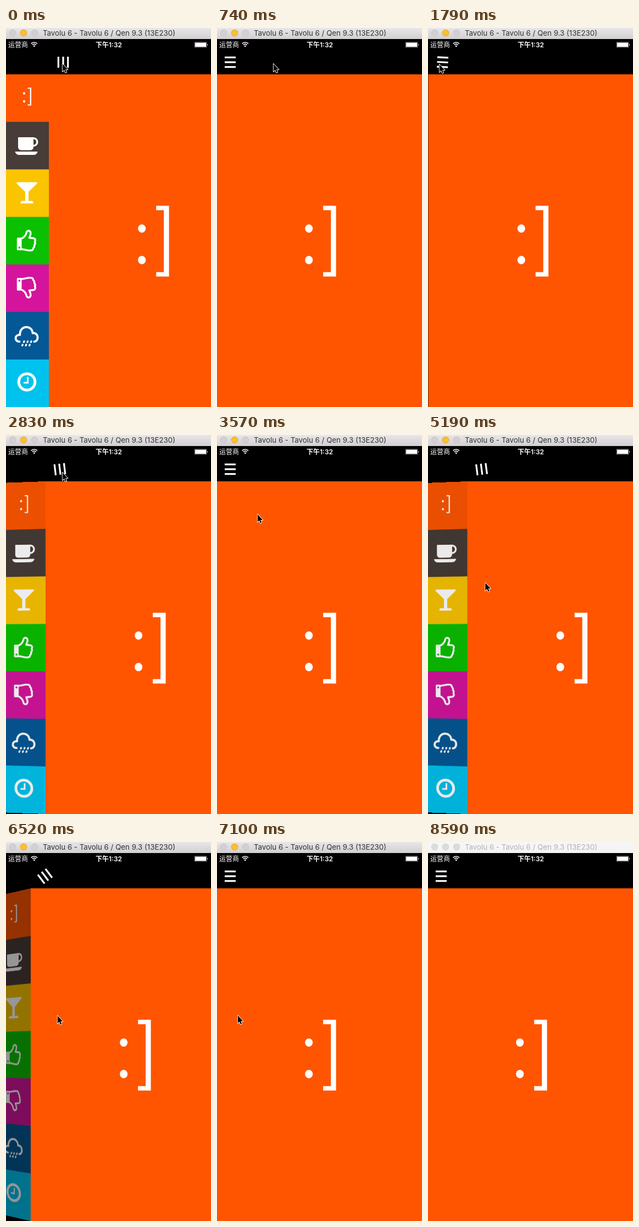
An HTML page with a canvas for the animation above (8.69 s loop, 373 by 687 pixels).

```html
<!DOCTYPE html>
<html lang="zh">
<head>
<meta charset="utf-8">
<title>Folding side menu</title>
<style>
  html, body { margin: 0; width: 100%; height: 100%; overflow: hidden; background: #000; }
  canvas { display: block; }
</style>
</head>
<body>
<canvas id="stage" width="373" height="687"></canvas>
<script>
const W = 373, H = 687, LOOP = 8690;
const TOP = 84, MENU_W = 80, MENU_H = H - TOP, ROW = MENU_H / 7, SS = 2;
const ORANGE = '#ff5500';
const TILES = [ORANGE, '#473c37', '#fac400', '#0bc000', '#d4149c', '#045896', '#00c2ee'];
const SANS = 'Inter, "Noto Sans CJK SC", "Noto Sans CJK", sans-serif';

const RUNS = [[0, 0, 1], [440, 1190, 6], [1790, 2530, 6], [2830, 5930, 22], [6220, 8140, 14], [8590, 8590, 1]];

// Pointer tip: [time, x, y]
const POINTER = [
  [0, 102, 64], [740, 102, 64], [1190, 20, 65], [2080, 20, 65], [2530, 102, 67],
  [3270, 102, 67], [4010, 30, 255], [4300, 30, 264], [4601, 50, 265], [5043, 86, 265],
  [5192, 103.5, 267], [5340, 114, 272], [5930, 126, 314], [6220, 122, 314],
  [6515, 93, 314], [6960, 47, 314], [7253, 27, 313], [7400, 33, 318], [7993, 283, 637]
];
const POINTER_OUT = 8130;

const stage = document.getElementById('stage');
const g = stage.getContext('2d');
g.imageSmoothingQuality = 'high';

const clamp = (v, a, b) => Math.min(b, Math.max(a, v));
const ease = p => (1 - Math.cos(Math.PI * clamp(p, 0, 1))) / 2;
const tap = (t, start) => ease((t - start) / 350);

function snap(t) {
  const [a, b, n] = RUNS.filter(r => t >= r[0]).pop();
  if (n < 2) return a;
  const step = (b - a) / (n - 1);
  return a + step * Math.min(n - 1, Math.floor((t - a + 12) / step));
}

function pointerAt(t) {
  const i = POINTER.findIndex(k => k[0] > t);
  if (i < 0) return POINTER[POINTER.length - 1].slice(1);
  const [t0, x0, y0] = POINTER[i - 1], [t1, x1, y1] = POINTER[i];
  const p = (t - t0) / (t1 - t0);
  return [x0 + (x1 - x0) * p, y0 + (y1 - y0) * p];
}

// How far the menu is pulled out, 0 to MENU_W
function shiftAt(t) {
  if (t < 440) return MENU_W;
  if (t < 1500) return MENU_W * (1 - tap(t, 390));
  if (t < 2650) return MENU_W * tap(t, 1750);
  if (t < 4200) return MENU_W * (1 - tap(t, 2768));
  if (t > 7050) return 0;
  return clamp(pointerAt(t)[0] - (t < 6100 ? 30 : 46), 0, MENU_W);
}

function rect(c, color, x, y, w, h) {
  c.fillStyle = color;
  c.fillRect(x, y, w, h);
}

function disc(c, color, x, y, rx, ry = rx) {
  c.fillStyle = color;
  c.beginPath();
  c.ellipse(x, y, rx, ry, 0, 0, Math.PI * 2);
  c.fill();
}

function stroke(c, d, width, color = '#fff') {
  c.strokeStyle = color;
  c.lineWidth = width;
  c.stroke(new Path2D(d));
}

function fill(c, d, color = '#fff') {
  c.fillStyle = color;
  c.fill(new Path2D(d));
}

function label(text, x, y, font, color, align) {
  g.font = font + ' ' + SANS;
  g.fillStyle = color;
  g.textAlign = align;
  g.fillText(text, x, y);
}

function drawThumb(c, hole) {
  fill(c, 'M21.5 380 H27 Q28.5 380 28.5 381.5 V401.5 Q28.5 403 27 403 H21.5 Q19.8 403 19.8 401 V382 Q19.8 380 21.5 380 Z');
  disc(c, hole, 24.3, 398, 1.7);
  stroke(c, 'M27.5 381.8 C32 380.5 35.5 376.5 37 372 C37.5 367 41.5 366.5 44 369 C46 372 44 376 42.5 380.3 L49.5 381 C53.5 381.5 54 385 52.5 387.5 C53.5 390 53 392 51.5 393.5 C52 396 51 398 49.5 399 C49.5 402.5 47 403.3 44 403.3 C37.5 403.3 33.5 401 27.5 401', 3.4);
}

function buildMenu() {
  const m = document.createElement('canvas');
  m.width = MENU_W * SS;
  m.height = Math.round(MENU_H * SS);
  const c = m.getContext('2d');
  c.scale(SS, SS);
  c.translate(2, -TOP);
  c.lineJoin = c.lineCap = 'round';
  TILES.forEach((color, i) => rect(c, color, -2, TOP + i * ROW, MENU_W, ROW + 1));

  // smile
  disc(c, '#fff', 33, 118.5, 2, 2.2);
  disc(c, '#fff', 33, 133, 2, 2.2);
  fill(c, 'M39.5 108 H46 V140.5 H39.5 V138.5 H43.6 V110 H39.5 Z');

  // coffee
  fill(c, 'M22 198 H50 V215 Q50 221.5 43.5 221.5 H28.5 Q22 221.5 22 215 Z');
  stroke(c, 'M49 199.8 H50 A6.8 6.8 0 0 1 50 213.4 H49', 3.2);
  fill(c, 'M16.5 224 H57.5 Q56 230 50 230 H24 Q18 230 16.5 224 Z');

  // cocktail
  fill(c, 'M20.5 279.5 H55.5 Q58 280.5 56 282.5 L41 297 V313.5 H47.5 Q50 314.5 49.5 318 H26.5 Q26 314.5 28.5 313.5 H35 V297 L20 282.5 Q18 280.5 20.5 279.5 Z');

  // thumbs
  drawThumb(c, TILES[3]);
  c.save();
  c.translate(0, 856);
  c.scale(1, -1);
  drawThumb(c, TILES[4]);
  c.restore();

  // rain cloud
  stroke(c, 'M24.5 568.5 C19 568.5 17.6 564.5 17.6 562.5 C17.6 558.5 21 556 25.3 556.3 C25 548 30 542.2 37 542.2 C43.5 542.2 48 546.5 48.5 553 C54 552.5 57.5 556 57.5 561 C57.5 565.5 54.5 568.5 51.5 568.5', 3.8);
  for (let i = 0; i < 3; i++) {
    const x = 33 + i * 6.5;
    stroke(c, `M${x} 567.8 l-.6 1.6 M${x - 2.8} 574 l-.6 1.6`, 3.1);
  }

  // clock
  c.strokeStyle = '#fff';
  c.lineWidth = 5;
  c.beginPath();
  c.arc(38, 641.5, 14.8, 0, Math.PI * 2);
  c.stroke();
  c.lineCap = 'butt';
  c.lineJoin = 'miter';
  stroke(c, 'M39.5 632.5 V643 H32', 3);
  return m;
}

const menu = buildMenu();

// The menu hinges on its right edge; each screen column samples its place on the tilted sheet.
function drawMenu(edge, open) {
  const a = (1 - open) * Math.PI / 2, cos = Math.cos(a), sin = Math.sin(a) / 1000;
  const depth = d => Math.max(0, d / (cos - d * sin));
  const mid = TOP + MENU_H / 2;
  g.globalAlpha = open;
  for (let x = 0; x < edge; x++) {
    const far = Math.min(MENU_W, depth(edge - x)), near = depth(edge - x - 1);
    if (near >= MENU_W || far - near < 1e-4) continue;
    const h = MENU_H / (1 + (far + near) / 2 * sin);
    g.drawImage(menu, (MENU_W - far) * SS, 0, (far - near) * SS, menu.height, x, mid - h / 2, 1, h);
  }
  g.globalAlpha = 1;
}

function drawDetail(s) {
  rect(g, ORANGE, s - 2, TOP, W + 4, MENU_H);
  g.save();
  g.translate(s, 0);
  disc(g, '#fff', 167.2, 363.5, 7, 7.6);
  disc(g, '#fff', 167.2, 420.7, 7, 7.6);
  fill(g, 'M193.2 322.3 H216.6 V450.5 H193.2 V442.5 H207.2 V330.3 H193.2 Z');
  g.restore();
}

function drawBurger(s) {
  g.save();
  g.translate(24 + s, 62);
  g.rotate(s / MENU_W * Math.PI / 2);
  for (const y of [-8.7, 0, 8.7]) rect(g, '#fff', -10, y - 1.6, 20, 3.2);
  g.restore();
}

function drawTitle(active) {
  const bar = g.createLinearGradient(0, 0, 0, 20);
  bar.addColorStop(0, active ? '#e8e6e8' : '#f6f6f6');
  bar.addColorStop(1, active ? '#d1cfd1' : '#f4f4f4');
  rect(g, bar, 0, 0, W, 20);
  [12, 32, 52].forEach((x, i) => {
    const on = active && i === 1;
    disc(g, on ? '#dfa023' : active ? '#c3c0c3' : '#d0d0d0', x, 9, 6.2);
    disc(g, on ? '#fdbe30' : active ? '#d3d0d3' : '#dbdbdb', x, 9, 5.5);
  });
  label('Tavolu 6 - Tavolu 6 / Qen 9.3 (13E230)', 187.5, 14, '13.3px', active ? '#333' : '#b2b2b2', 'center');
}

function drawStatus() {
  label('运营商', 4, 34.5, '12px', '#fff', 'left');
  label('下午1:32', 187, 34.5, '600 12px', '#fff', 'center');
  g.strokeStyle = '#fff';
  g.lineWidth = 1.7;
  for (const r of [4.8, 8]) {
    g.beginPath();
    g.arc(51.3, 34, r, -Math.PI * 0.75, -Math.PI * 0.25);
    g.stroke();
  }
  fill(g, 'M51.3 34.6 l-2 -2.2 q2 -1.6 4 0 Z');
  g.strokeStyle = '#aaa';
  g.lineWidth = 0.8;
  g.strokeRect(343.4, 25.9, 21.4, 9);
  rect(g, '#fff', 344.2, 26.7, 19.8, 7.4);
  fill(g, 'M366 28.6 Q368 30.3 366 32.2 Z');
}

function drawPointer(x, y) {
  const arrow = 'M0 0 V14 L3.1 11.1 L5.2 16 L7.3 15.1 L5.3 10.3 H9.6 Z';
  g.save();
  g.translate(x + 0.8, y + 1);
  g.lineJoin = 'round';
  stroke(g, arrow, 1.8);
  fill(g, arrow, '#000');
  g.restore();
}

function draw(now) {
  const t = snap(now % LOOP), s = shiftAt(t);
  rect(g, '#000', 0, 0, W, H);
  drawMenu(s - 2, s / MENU_W);
  drawDetail(s);
  drawTitle(t < 8590);
  drawStatus();
  drawBurger(s);
  if (t < POINTER_OUT) drawPointer(...pointerAt(t));
}

const start = performance.now();
function frame() {
  draw(performance.now() - start);
  requestAnimationFrame(frame);
}
frame();
</script>
</body>
</html>
```
